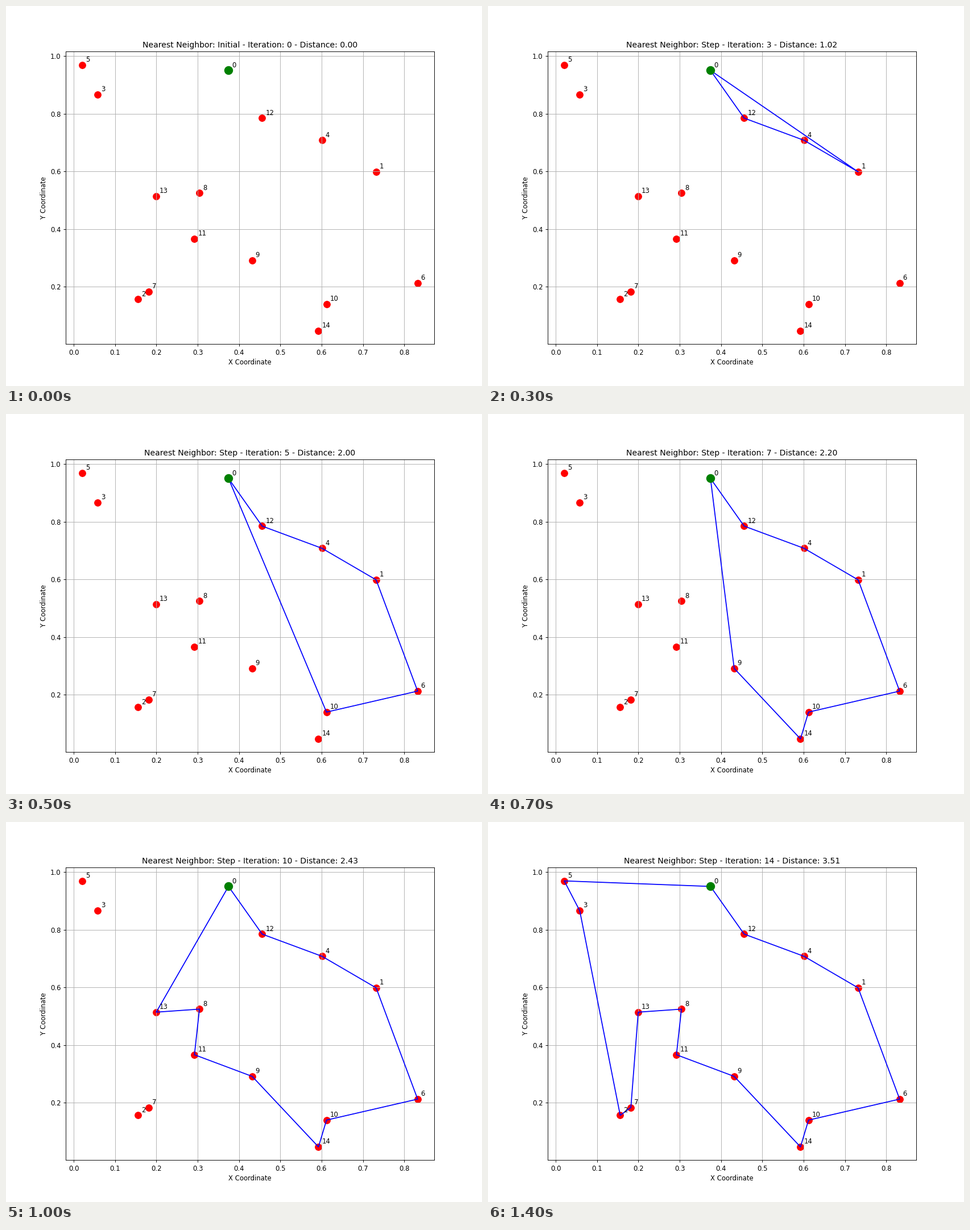
These frames come from a looping animation (837x669 px, 1.5 s). A matplotlib script:

```python
import numpy as np
import matplotlib.pyplot as plt
from matplotlib.animation import FuncAnimation

W, H, DPI = 837, 669, 83.7
COUNT = 15
STEP_MS = 100

plt.rcParams["font.family"] = "DejaVu Sans"

np.random.seed(42)
cities = np.random.rand(COUNT, 2)


def nearest_route(points):
    """Visit order from city 0, always moving to the closest unvisited city."""
    route = [0]
    left = set(range(1, len(points)))
    while left:
        here = points[route[-1]]
        nxt = min(left, key=lambda i: np.hypot(*(points[i] - here)))
        route.append(nxt)
        left.remove(nxt)
    return route


route = nearest_route(cities)

# The tiny surplus keeps the pixel size from rounding down.
fig, ax = plt.subplots(figsize=((W + 1e-6) / DPI, (H + 1e-6) / DPI), dpi=DPI)
ax.scatter(cities[1:, 0], cities[1:, 1], s=100, c="red")
ax.scatter(*cities[0], s=150, c="green", zorder=5)
for i, city in enumerate(cities):
    ax.annotate(str(i), city, xytext=(5, 5), textcoords="offset points")
ax.set_xlabel("X Coordinate")
ax.set_ylabel("Y Coordinate")
ax.grid(True)

# Freeze the limits so the growing tour never rescales the plot.
ax.set_xlim(ax.get_xlim())
ax.set_ylim(ax.get_ylim())

tour, = ax.plot([], [], "b-", lw=1.5)
title = ax.set_title("")


def draw(step):
    loop = cities[route[:step + 1] + [0]]
    length = np.hypot(*np.diff(loop, axis=0).T).sum()
    if step:
        tour.set_data(loop[:, 0], loop[:, 1])
    else:
        tour.set_data([], [])
    stage = "Step" if step else "Initial"
    title.set_text(f"Nearest Neighbor: {stage} - Iteration: {step}"
                   f" - Distance: {length:.2f}")
    return tour, title


anim = FuncAnimation(fig, draw, frames=COUNT, init_func=lambda: draw(0),
                     interval=STEP_MS, repeat=True, repeat_delay=0)
plt.show()
```
